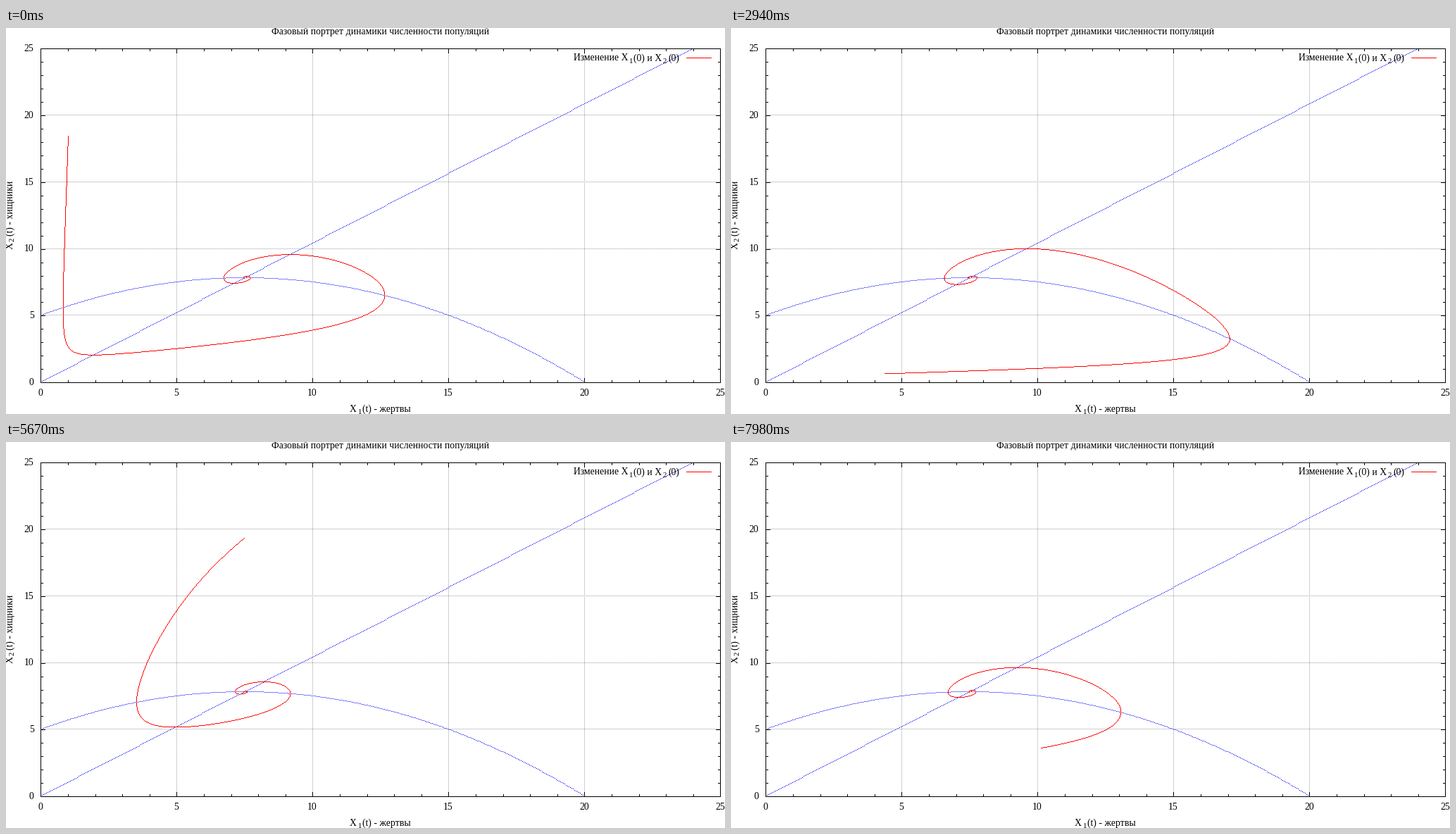
Animation, 1021 px wide and 548 px high, one loop 8 s. Source, as a matplotlib script:

```python
import numpy as np
import matplotlib.pyplot as plt
from matplotlib.animation import FuncAnimation

W, H, DPI = 1021, 548, 100
PX = 72 / DPI                       # one pixel in points
LOOP, INTERVAL, HOLD = 8000, 40, 70  # ms
STEPS = 115
FONT, SIZE, SUB = "Liberation Serif", 13.7, 10.9
X0, XS, Y0, YS = 48.9, 38.6, 502.6, 18.95


def sx(x):
    return X0 + XS * x


def sy(y):
    return Y0 - YS * y


def mid(v):
    """Centre of the pixel that holds v."""
    return np.floor(v) + 0.5


# Holling-Tanner predator-prey model
S, RATIO = 0.4, 0.96


def rates(p):
    x, y = p
    return np.array([x * (1 - x / 20 - y / (x + 5)),
                     S * y * (1 - RATIO * y / x)])


def trajectories(x0, y0, dt=0.02, n=3000):
    p = np.array([x0, y0])
    path = [p]
    for _ in range(n):
        a = rates(p)
        b = rates(p + a * dt / 2)
        c = rates(p + b * dt / 2)
        d = rates(p + c * dt)
        p = p + (a + 2 * b + 2 * c + d) * dt / 6
        path.append(p)
    return np.array(path)


def trace(x, y):
    """Pixels of a thin line: one per step along the steeper axis."""
    step = np.maximum(np.abs(np.diff(x)), np.abs(np.diff(y)))
    length = np.concatenate([[0], np.cumsum(step)])
    at = np.arange(0, length[-1])
    return mid(np.interp(at, length, x)), mid(np.interp(at, length, y))


start = 1 + 0.08 * np.arange(STEPS)
paths = trajectories(start, 10 + 10 * np.sin(start))
traces = [trace(sx(paths[:, 0, k]), sy(paths[:, 1, k])) for k in range(STEPS)]

fig = plt.figure(figsize=(W / DPI, H / DPI), dpi=DPI, facecolor="white")
ax = fig.add_axes([0, 0, 1, 1])
ax.set_xlim(0, W)
ax.set_ylim(H, 0)
ax.axis("off")


def dots(x, y, color, z):
    x, y = np.broadcast_arrays(mid(x), mid(y))
    return ax.plot(x, y, ",", color=color, zorder=z)[0]


def stroke(x, y, cap="butt"):
    # a width just under one pixel keeps snapping on pixel centres
    ax.plot(x, y, color="black", lw=0.99 * PX, antialiased=False, zorder=5,
            solid_capstyle=cap, solid_joinstyle="miter")


def label(x, y, s, size=SIZE, ha="left", angle=0):
    ax.text(x, y, s, family=FONT, fontsize=size * PX, ha=ha, va="baseline",
            rotation=angle, rotation_mode="anchor", zorder=6)


left, right, top, bottom = mid(sx(0)), mid(sx(25)), mid(sy(25)), mid(sy(0))

# dotted grid
for v in (5, 10, 15, 20):
    dots(np.arange(left, right, 2), sy(v), "#a0a0a0", 1)
    dots(sx(v), np.arange(bottom, top, -2), "#a0a0a0", 1)

# isoclines
cols = np.arange(left, sx(24), 2)
dots(cols, sy((cols - left) / XS / RATIO), "blue", 2)
cols = np.arange(left, sx(20), 2)
prey = (cols - left) / XS
dots(cols, sy(0.05 * (20 - prey) * (prey + 5)), "blue", 2)

# border and mirrored ticks
stroke([left, right, right, left, left], [bottom, bottom, top, top, bottom],
       "projecting")
tx, ty = [], []
for v in range(26):
    n = 3 if v % 5 else 6
    x, y = mid(sx(v)), mid(sy(v))
    for edge, way in ((bottom, -n), (top, n)):
        tx += [x, x, np.nan]
        ty += [edge, edge + way, np.nan]
    for edge, way in ((left, n), (right, -n)):
        tx += [edge, edge + way, np.nan]
        ty += [y, y, np.nan]
stroke(tx, ty)

for v in range(0, 26, 5):
    label(sx(v), 522, str(v), ha="center")
    label(39.5, sy(v) + 4.3, str(v), ha="right")

label(377, 9, "Фазовый портрет динамики численности популяций")

label(488, 545, "X")
label(499.5, 548, "1", SUB)
label(506, 545, "(t) - жертвы")

label(9.5, 314, "X", angle=90)
label(12, 303, "2", SUB, angle=90)
label(9.5, 295, "(t) - хищники", angle=90)

label(805.5, 46.5, "Изменение X")
label(884, 49.5, "1", SUB)
label(891, 46.5, "(0) и X")
label(932.5, 49.5, "2", SUB)
label(940, 46.5, "(0)")
dots(np.arange(965, 1001), 42, "red", 4)

curve = dots([], [], "red", 4)


def update(i):
    k = min((i * INTERVAL + 30) // HOLD, STEPS - 1)
    curve.set_data(*traces[k])
    return (curve,)


update(0)
anim = FuncAnimation(fig, update, frames=LOOP // INTERVAL, interval=INTERVAL,
                     repeat=True, repeat_delay=0, blit=False)
plt.show()
```
